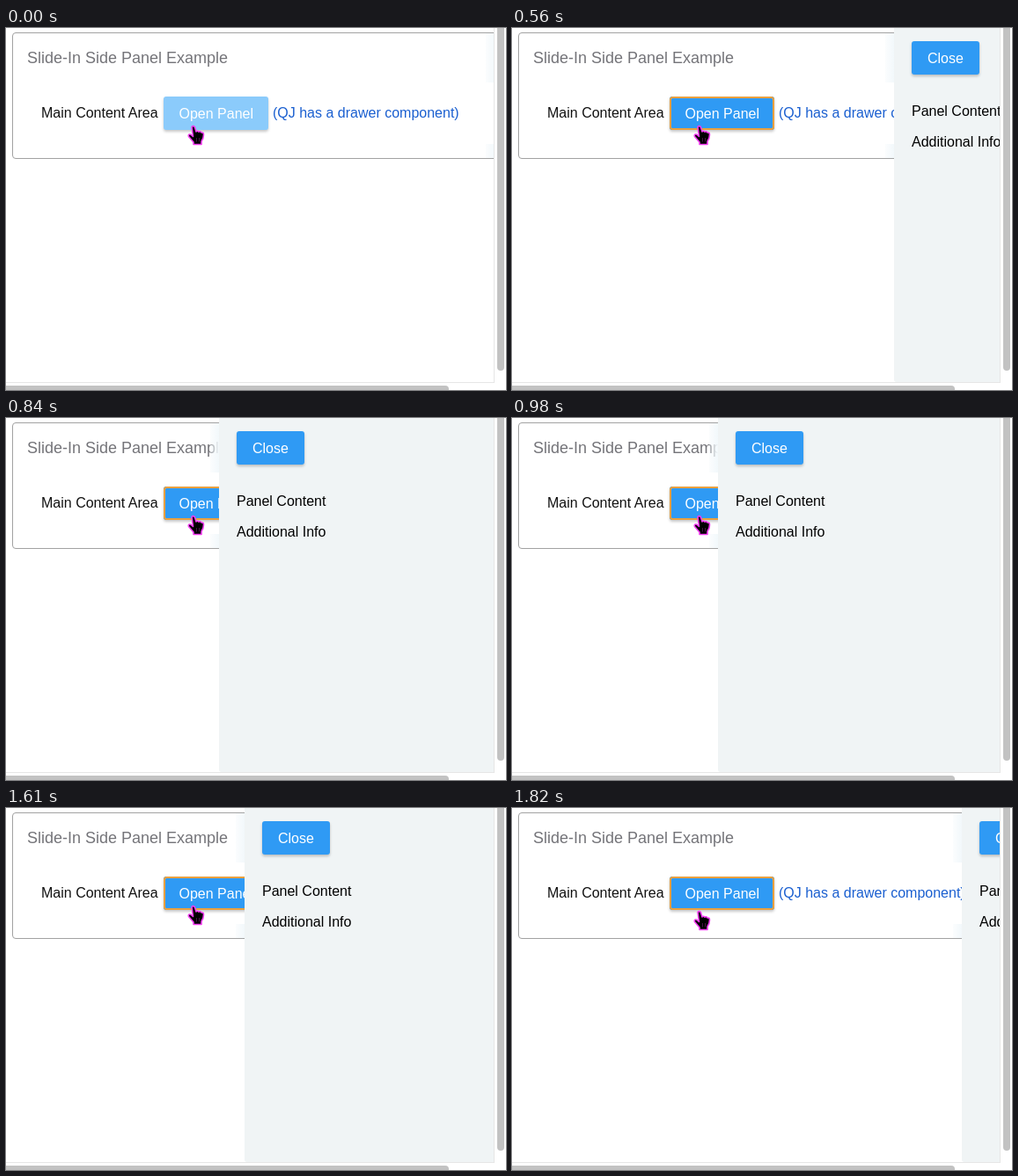
Write an HTML page that moves like this. It is 568 px wide and 412 px high and loops after 1.89 s.

```html
<!DOCTYPE html>
<html lang="en">
<head>
<meta charset="utf-8">
<title>Side panel</title>
<style>
  html, body { margin: 0; width: 100%; height: 100%; overflow: hidden; background: #fff; }
  svg { display: block; width: 568px; height: 412px; font: 16px "Liberation Sans", Arial, sans-serif; }
  .button { filter: drop-shadow(0 2px 1.5px rgba(0, 0, 0, .22)); }
  .label { fill: #fff; }
</style>
</head>
<body>
<svg viewBox="0 0 568 412">
  <defs>
    <clipPath id="view"><path d="M0 0H554V403H0Z"/></clipPath>
    <linearGradient id="shade">
      <stop stop-color="#f2f8fb" stop-opacity=".3"/>
      <stop offset="1" stop-color="#f2f8fb"/>
    </linearGradient>
  </defs>

  <g clip-path="url(#view)">
    <rect x="7.5" y="5.5" width="700" height="143" rx="3.5" fill="none" stroke="#a2a2a2"/>
    <text x="24" y="40" font-size="18" fill="#747479">Slide-In Side Panel Example</text>
    <text x="40" y="102" fill="#111">Main Content Area</text>
    <rect id="open" class="button" x="179" y="78" width="119" height="38" rx="3"/>
    <rect id="focus" x="180" y="79" width="117" height="36" rx="2.5" fill="none" stroke="#e9a03f" stroke-width="2"/>
    <text class="label" x="196.5" y="103">Open Panel</text>
    <text x="303" y="102" fill="#1a5fd0">(QJ has a drawer component)</text>

    <g id="panel">
      <path d="M-10 6H0V62H-10ZM-10 132H0V148H-10Z" fill="url(#shade)"/>
      <rect width="340" height="403" rx="3" fill="#f0f4f5"/>
      <rect width="340" height="10" fill="#f0f4f5"/>
      <rect class="button" x="20" y="15" width="77" height="38" rx="3" fill="#2f9af4"/>
      <text class="label" x="38" y="40">Close</text>
      <text x="20" y="100">Panel Content</text>
      <text x="20" y="135">Additional Info</text>
    </g>
  </g>

  <path d="M554.5 0V403.5M0 403.5H555" fill="none" stroke="#e6e6e6"/>
  <rect x="558" y="-8" width="8" height="398" rx="4" fill="#c2c2c2"/>
  <rect x="-8" y="407" width="511" height="9" rx="4" fill="#c2c2c2"/>

  <circle id="ring" cx="206" cy="107" r="42" fill="none" stroke="#000" stroke-width="3"/>
  <g id="cursor" stroke-linejoin="round">
    <path id="hand" fill="#000" stroke="#f23cf0" stroke-width="1.6"
      d="M211 112.5Q213 110.5 214.5 113L216 118Q217.5 116.5 219 118.2Q220.5 117 222 119Q224.5 118.5 224.5 121.5Q224.5 126 222 129V132.5H213V130L207.5 123.5Q206.5 120.5 209.5 121L212.5 123.5Z"/>
    <path d="M216.5 125V129.5M219.5 125V129.5" stroke="#7b1c7a" stroke-width=".6"/>
  </g>
</svg>
<script>
const LOOP = 1890, STEP = 70, CLOSED = 555, OPENED = 234;
const BLUE = "#2f9af4", HOVER = "#8bcbfb", PRESSED = "#2368e6";
const part = id => document.getElementById(id);
const clamp = v => Math.min(1, Math.max(0, v));
const bezier = (a, b, s) => 3 * a * s * (1 - s) ** 2 + 3 * b * s * s * (1 - s) + s ** 3;

// Same curve as the CSS "ease" keyword
function ease(t) {
  let low = 0, high = 1;
  for (let i = 0; i < 20; i++) {
    const mid = (low + high) / 2;
    if (bezier(.25, .25, mid) < t) low = mid; else high = mid;
  }
  return bezier(.1, 1, high);
}

const progress = (t, start, duration) => {
  const p = clamp((t - start) / duration);
  return p === 0 || p === 1 ? p : ease(p);
};

function draw(t) {
  const slide = progress(t, 442, 500) - progress(t, 1558, 460);
  const x = Math.round(CLOSED + (OPENED - CLOSED) * slide);
  part("panel").setAttribute("transform", `translate(${x} 0)`);

  const sinceClick = t - (t < 1330 ? 210 : 1330);
  const down = sinceClick >= 0 && sinceClick < STEP;
  const releasing = sinceClick >= STEP && sinceClick < 2 * STEP;
  part("ring").style.display = down ? "" : "none";
  part("open").style.fill = t < 210 ? HOVER : down ? PRESSED : releasing ? "#2a86ef" : BLUE;
  part("focus").style.display = t < 210 || down ? "none" : "";

  const drop = Math.round(6 * clamp((t - 1700) / 120));
  part("cursor").setAttribute("transform", `translate(0 ${drop})`);
}

function tick() {
  const t = performance.now() % LOOP;
  draw(Math.floor(t / STEP) * STEP);
  requestAnimationFrame(tick);
}
tick();
</script>
</body>
</html>
```
